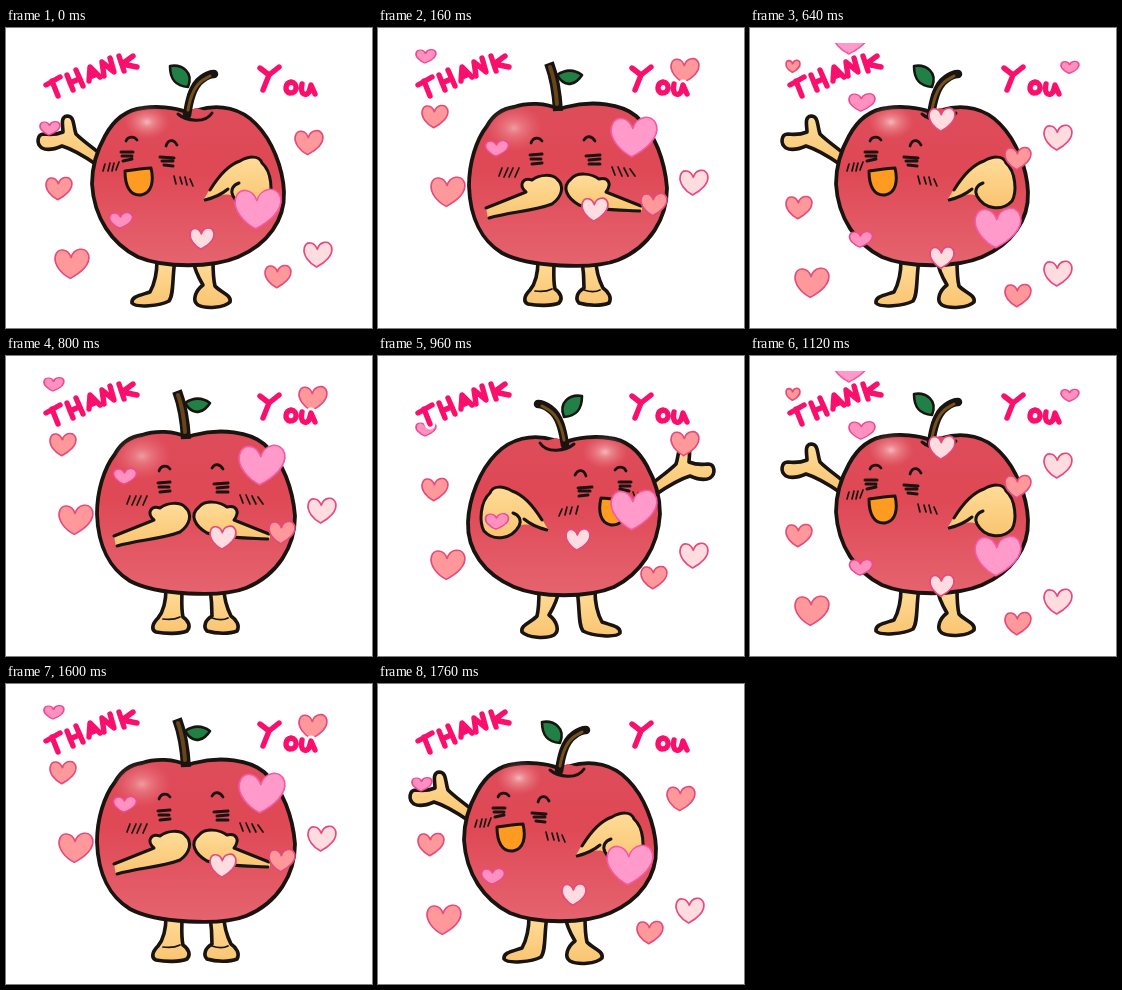
An HTML page for the animation above (1920 ms loop, 366x300 px).

```html
<!DOCTYPE html>
<html lang="en">
<head>
<meta charset="utf-8">
<title>Thank you</title>
<style>
html, body { margin: 0; width: 100%; height: 100%; overflow: hidden; background: #fff; }
svg { display: block; width: 366px; height: 300px; }
.line { fill: none; stroke: #1a1411; stroke-width: 3; stroke-linecap: round; stroke-linejoin: round; }
.thin { stroke-width: 1.7; }
.brow { stroke-width: 2.8; }
.edge { stroke-width: 3.8; fill: url(#red); }
.skin { fill: url(#skin); }
.skin.line { stroke-width: 3.6; }
.leaf { fill: #218045; stroke-width: 2.6; }
</style>
</head>
<body>
<svg viewBox="0 0 366 300" role="img" aria-label="THANK YOU">
  <defs>
    <linearGradient id="red" x1="0" y1="0" x2="0" y2="1">
      <stop offset="0" stop-color="#de4c5a"/>
      <stop offset=".4" stop-color="#df4855"/>
      <stop offset="1" stop-color="#e5646f"/>
    </linearGradient>
    <linearGradient id="skin" x1="0" y1="0" x2="0" y2="1">
      <stop offset="0" stop-color="#ffdc98"/>
      <stop offset="1" stop-color="#f9c470"/>
    </linearGradient>
    <radialGradient id="shine">
      <stop offset="0" stop-color="#ffe6e6" stop-opacity=".7"/>
      <stop offset=".3" stop-color="#f9b9bd" stop-opacity=".5"/>
      <stop offset="1" stop-color="#ec8990" stop-opacity="0"/>
    </radialGradient>
    <clipPath id="sky"><path d="M0 15H366V300H0Z"/></clipPath>

    <g id="wave">
      <path class="skin line" d="M151 232C151 244 149 255 144 264C136 267 125 268 126 275C130 280 154 278 163 273C168 267 166 250 169 232M187 232C189 244 194 252 197 257C189 263 186 273 192 277C200 281 218 280 224 274C226 267 214 264 209 258C207 250 207 242 207 232"/>
      <path class="skin line" d="M91 137C78 128 66 121 56 118C49 121 42 123 36 120C30 116 31 106 38 106C46 107 52 106 57 104C57 98 54 89 61 88C69 88 67 98 70 106C77 113 86 119 93 125"/>
      <path class="line edge" d="M180 84C168 79 150 78 137 80C118 82 106 95 99 108C90 124 86 140 86 156C88 190 106 216 132 229C158 240 206 240 232 229C262 216 279 192 278 164C277 140 266 112 250 96C236 81 214 75 192 82Z"/>
      <path d="M174 86L190 80L204 84L190 92Z" fill="#de4c5a"/>
      <ellipse cx="141" cy="94" rx="23" ry="17" fill="url(#shine)"/>
      <path class="line" d="M172 86C180 93 199 96 206 85"/>
      <path class="line" style="stroke-width:8.5" d="M181 87C183 74 186 58 196 51C200 48 204 46 208 46"/>
      <path class="line" style="stroke:#75501d;stroke-width:3" d="M182 82C184 70 188 58 197 52L204 48"/>
      <path class="line leaf" d="M164 38C176 36 188 44 182 59C169 58 164 51 164 38Z"/>
      <path class="line brow" d="M120 113C122 108 128 108 131 112M160 118C162 111 168 111 171 117"/>
      <path class="line" d="M115 124L127 124M116 128L126 128M117 133L126 131M154 129L168 130M156 133L167 133M158 137L167 138"/>
      <path class="line" style="fill:#ff9b20" d="M119 143C128 142 137 140 145 140C148 153 146 165 135 167C124 168 119 158 119 143Z"/>
      <path class="line thin" d="M99 136L97 143M104 135L102 143M108 135L106 143M113 134L110 142M168 148L170 156M174 149L176 156M179 149L181 157M184 151L187 158"/>
      <path class="skin" d="M197 173C206 157 218 138 234 133C243 128 253 127 256 135C266 144 267 164 262 173C252 184 234 181 227 168C218 164 208 169 197 173Z"/>
      <path class="line" d="M204 162C212 149 222 137 234 133C243 128 253 127 256 135C266 144 267 164 262 173C252 184 234 181 227 168C224 162 227 157 233 155M199 172C207 170 216 166 222 161"/>
    </g>

    <g id="clap">
      <path class="skin line" d="M160 232C160 246 158 255 152 262C146 268 145 274 150 276C160 278 174 278 181 275C185 271 183 265 177 261C175 252 176 243 176 232M204 232C206 246 206 254 206 260C199 264 197 271 201 275C210 278 224 278 231 275C234 270 231 264 225 260C220 250 218 242 218 232"/>
      <path class="line thin" d="M157 263C164 264 170 263 174 261M206 262C212 264 218 264 222 262"/>
      <path class="line edge" d="M181 81C168 75 150 74 136 79C122 81 114 89 109 98C98 112 91 135 91 158C92 190 104 213 124 225C150 239 215 242 240 232C272 219 289 190 289 160C287 134 277 104 258 88C244 76 215 72 188 79Z"/>
      <ellipse cx="136" cy="100" rx="29" ry="23" fill="url(#shine)" opacity=".75"/>
      <path class="line" style="stroke-width:10;stroke-linecap:butt" d="M180 83C179 66 177 51 171 35"/>
      <path class="line" style="stroke:#68451b;stroke-width:4" d="M179 76C178 62 176 50 172 39"/>
      <path class="line leaf" d="M179 47C188 41 197 42 204 47C199 55 188 62 179 47Z"/>
      <path class="line brow" d="M153 115C155 109 161 109 164 113M206 112C209 107 214 108 217 113"/>
      <path class="line" d="M152 127L164 126M153 131L163 131M154 136L164 135M208 128L222 127M211 132L222 131M211 136L222 136"/>
      <path class="line thin" d="M124 140L121 148M130 140L126 149M135 140L131 149M141 140L137 149M234 139L237 147M240 139L244 148M246 140L250 148M252 141L257 148"/>
      <path class="skin" d="M108 180L148 164C140 157 145 149 154 152C162 146 174 146 179 151C187 158 184 169 174 177C158 183 130 184 110 191Z"/>
      <path class="line" d="M108 180L148 164C140 157 145 149 154 152C162 146 174 146 179 151C187 158 184 169 174 176C156 183 132 184 111 190"/>
      <path class="skin" d="M264 179L228 164C234 156 231 149 221 151C213 145 199 144 193 151C183 159 189 170 201 178C216 183 240 182 264 184Z"/>
      <path class="line" d="M263 178L228 164C234 156 231 149 221 151C213 145 199 144 193 151C183 159 189 170 201 177C216 182 240 182 262 183"/>
    </g>

    <path id="words" d="M40 57L54 49M46 53L52 68M61 47L67 62M70 42L77 58M64 55L73 51M83 53L84 39L94 49M84 49L91 46M98 48L96 34L108 44L104 30M113 28L118 43M127 28L116 36L131 39M254 40L263 47M273 39L263 47L257 62M285 54C279 55 278 64 284 65C292 65 292 55 285 54M296 56C294 66 299 69 303 64L305 57L309 66"/>
  </defs>

  <g id="hero"></g>
  <g id="hearts" clip-path="url(#sky)"></g>
  <g fill="none" stroke-linecap="round" stroke-linejoin="round">
    <use href="#words" stroke="#fff" stroke-width="11"/>
    <use href="#words" stroke="#fa0f6c" stroke-width="5.4"/>
  </g>
</svg>
<script>
const STEP = 160;
const ORDER = "ACEBDCEDBECA";
const HEART = "M-.05-.35C.1-.95.8-1.1.98-.5C1.1.1.5.65-.1.98C-.6.72-1.1.1-.98-.45C-.85-1-.25-.95-.05-.35Z";

// fill, outline and height ratio per kind
const INK = {
  salmon: ["#ff989b", "#e64a78", 0.92],
  pale: ["#ffdce0", "#e8487c", 0.95],
  pink: ["#ff91c0", "#ee4a90", 0.72],
  big: ["#ff9acb", "#f7579f", 0.92]
};

// x, y, half width, kind
const FLOCK = [
  [44, 100, 10, "pink"], [53, 160, 13, "salmon"], [66, 235, 17, "salmon"],
  [115, 192, 11.5, "pink"], [196, 210, 12, "pale"], [252, 180, 23, "big"],
  [303, 114, 14, "salmon"], [312, 226, 14, "pale"], [272, 248, 13, "salmon"]
];

// pose, flock drift, missing flock members, additional hearts
const SCENES = {
  A: { pose: "left", drift: [0, 0] },
  B: { pose: "clap", drift: [-8, -53], skip: [5],
       more: [[101, 72, 20, "big"], [316, 104, 8.5, "pink"]] },
  C: { pose: "clap", drift: [4, -72], skip: [4], more: [[217, 181, 13, "pale"]] },
  D: { pose: "left", drift: [-4, 19], skip: [0, 6],
       more: [[112, 74, 13, "pink"], [192, 91, 13, "pale"], [268, 130, 13, "salmon"],
              [308, 109, 14, "pale"], [320, 39, 9, "pink"], [101, 8, 20, "big"],
              [43, 38, 7, "salmon"]] },
  E: { pose: "right", drift: [4, -27] }
};

const POSES = {
  left: '<use href="#wave"/>',
  clap: '<use href="#clap"/>',
  right: '<use href="#wave" transform="translate(368 2) scale(-1 1)"/>'
};

const hero = document.getElementById("hero");
const hearts = document.getElementById("hearts");

function heart([x, y, r, kind]) {
  const [fill, stroke, tall] = INK[kind];
  return `<path d="${HEART}" transform="translate(${x} ${y}) scale(${r} ${r * tall})" ` +
    `fill="${fill}" stroke="${stroke}" stroke-width="${1.7 / r}" stroke-linejoin="round"/>`;
}

let shown = "";

function show(key) {
  if (key === shown) return;
  shown = key;
  const { pose, drift: [dx, dy], skip = [], more = [] } = SCENES[key];
  const flock = FLOCK.filter((_, i) => !skip.includes(i))
    .map(([x, y, r, kind]) => [x + dx, y + dy, r, kind]);
  hero.innerHTML = POSES[pose];
  hearts.innerHTML = [...flock, ...more].map(heart).join("");
}

function tick() {
  show(ORDER[Math.floor(performance.now() / STEP) % ORDER.length]);
  requestAnimationFrame(tick);
}
tick();
</script>
</body>
</html>
```
